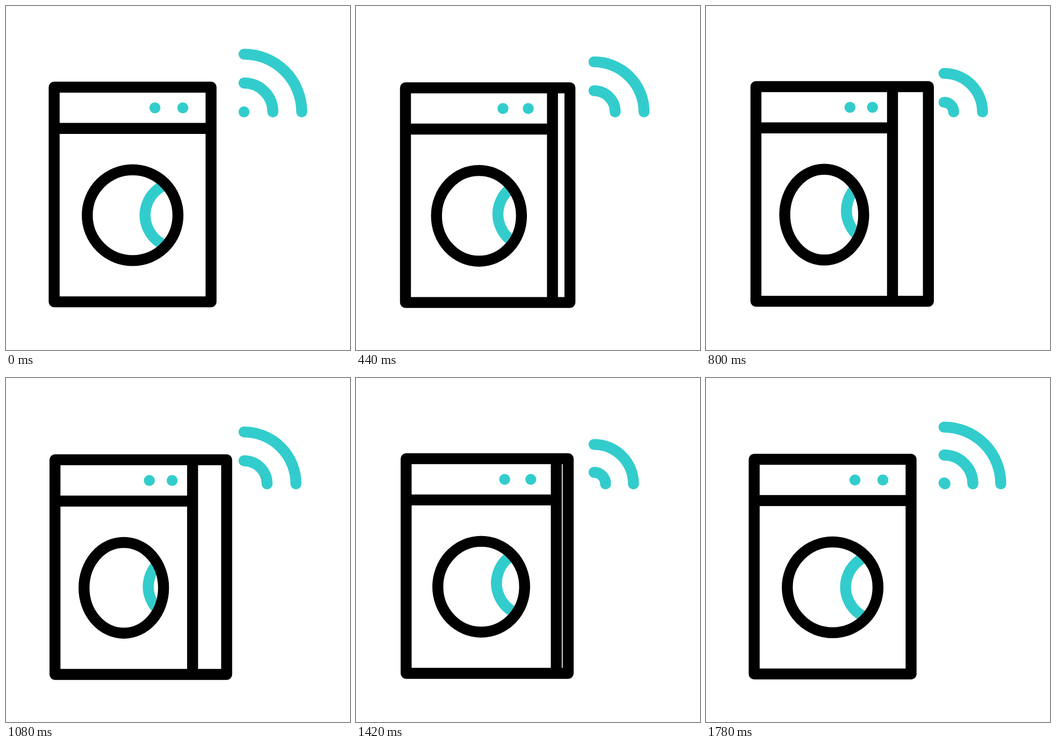
Animation, 640 px wide and 640 px high, one loop 1.8 s. Source, as an HTML page with a canvas:

```html
<!DOCTYPE html>
<html lang="en">
<head>
<meta charset="utf-8">
<title>Smart washing machine</title>
<style>
  html, body { margin: 0; width: 100%; height: 100%; overflow: hidden; background: #fff; }
  canvas { display: block; width: 100vmin; height: 100vmin; }
</style>
</head>
<body>
<canvas id="stage" width="640" height="640"></canvas>
<script>
const ctx = document.getElementById('stage').getContext('2d');
const LOOP = 1800, STEP = 20, CYCLE = 600;
const BLACK = '#000', TEAL = '#33cccc', LINE = 20.4;
const TAU = Math.PI * 2;

const WAVE = { x: 442.8, y: 197, speed: 53.7 / CYCLE, life: 1310, max: 117.2 };
const WAVE_STARTS = [-1200, -600, 0, 600, 1180, 1760];

// Water offset inside the drum: [phase, x, y]
const SLOSH = [[0, 0, 0], [0.33, 2.6, -8.5], [0.43, 2.6, -6], [0.8, 6, -1], [1, 0, 0]];

const mix = (a, b, k) => a + (b - a) * k;

// Cubic ease with control points (.5, 0) and (.5, 1)
function ease(x) {
  let lo = 0, hi = 1;
  for (let i = 0; i < 24; i++) {
    const s = (lo + hi) / 2, q = 1 - s;
    if (1.5 * q * s + s * s * s - 1.5 * q * s * s * 0 > x + 1.5 * q * s * (1 - q - s)) {
      hi = s;
    } else {
      lo = s;
    }
  }
  return lo * lo * (3 - 2 * lo);
}

// Turn of the machine: 0 is frontal, 1 is fully turned
function turnAt(t) {
  if (t < 900) return ease(t / 900);
  return ease(Math.max(0, (1780 - t) / 880));
}

function sloshAt(p) {
  const i = SLOSH.findIndex(k => k[0] > p);
  const a = SLOSH[i - 1], b = SLOSH[i];
  const k = (p - a[0]) / (b[0] - a[0]);
  return { x: mix(a[1], b[1], k), y: mix(a[2], b[2], k) };
}

function stroke(color, trace) {
  ctx.strokeStyle = color;
  ctx.beginPath();
  trace();
  ctx.stroke();
}

function dot(x, y) {
  ctx.fillStyle = TEAL;
  ctx.beginPath();
  ctx.arc(x, y, LINE / 2, 0, TAU);
  ctx.fill();
}

function drawWaves(t) {
  for (const start of WAVE_STARTS) {
    const age = t - start;
    if (age < 0 || age > WAVE.life) continue;
    const r = Math.min(age * WAVE.speed, WAVE.max);
    if (r < 0.5) dot(WAVE.x, WAVE.y);
    else stroke(TEAL, () => ctx.arc(WAVE.x, WAVE.y, r, -Math.PI / 2, 0));
  }
}

function drawWasher(t) {
  const p = (t % CYCLE) / CYCLE, turn = turnAt(t);
  const dx = 2.2 * (1 - Math.cos(TAU * p)), dy = -1.2 * Math.sin(TAU * p);
  const left = 89.6 + dx, front = 381.5 - 38.5 * turn + dx, side = 381.5 + 29.5 * turn + dx;
  const top = 151 + dy, bottom = 550.4 + dy, bar = 227.8 + dy;
  const cx = (left + front) / 2, cy = 389.2 + dy;
  const ry = 84.4, rx = ry * (front - left) / 292;
  const door = () => ctx.ellipse(cx, cy, rx, ry, 0, 0, TAU);

  const water = sloshAt(p);
  ctx.save();
  ctx.beginPath();
  door();
  ctx.clip();
  stroke(TEAL, () => ctx.arc(319.8 + water.x, 389 + water.y, 61, Math.PI * 0.6, Math.PI * 1.4));
  ctx.restore();

  stroke(BLACK, door);
  stroke(BLACK, () => {
    ctx.rect(left, top, side - left, bottom - top);
    ctx.moveTo(front, top);
    ctx.lineTo(front, bottom);
    ctx.moveTo(left, bar);
    ctx.lineTo(front, bar);
  });
  dot(277.1 - 12.8 * turn + dx, 189.5 + dy);
  dot(329 - 23 * turn + dx, 189.5 + dy);
}

function draw(now) {
  const t = Math.floor((now % LOOP) / STEP) * STEP;
  ctx.fillStyle = '#fff';
  ctx.fillRect(0, 0, 640, 640);
  ctx.lineWidth = LINE;
  ctx.lineCap = ctx.lineJoin = 'round';
  drawWasher(t);
  drawWaves(t);
}

let begin = null;
function tick(now) {
  if (begin === null) begin = now;
  draw(now - begin);
  requestAnimationFrame(tick);
}
draw(0);
requestAnimationFrame(tick);
</script>
</body>
</html>
```
